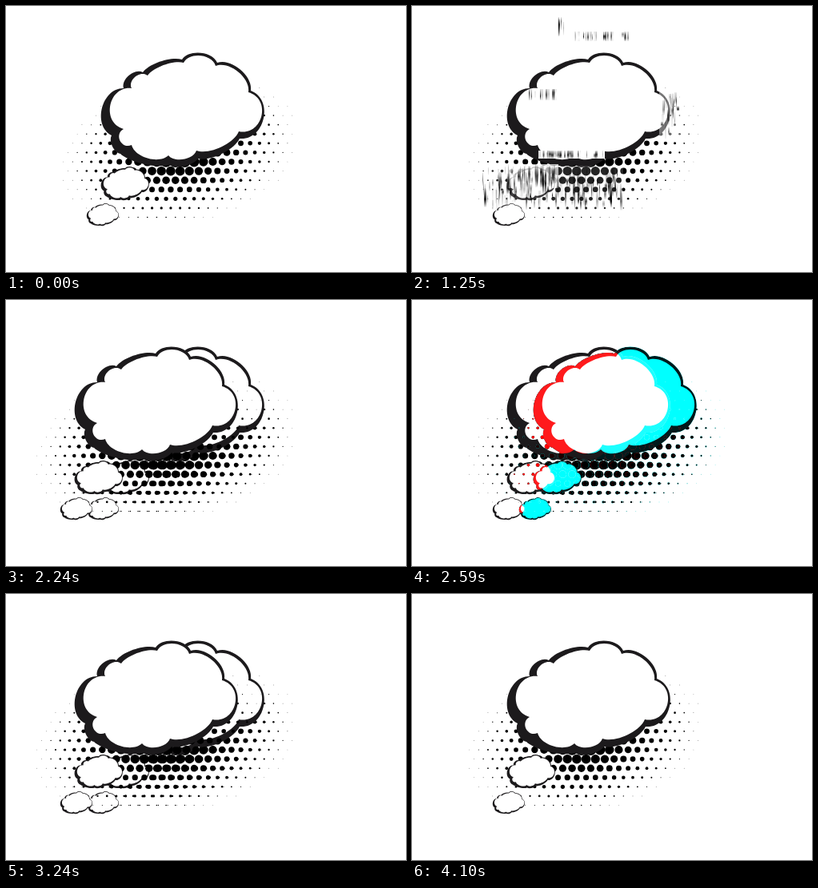
Write an HTML page with a canvas that moves like this. It is 500 px wide and 333 px high and loops after 4.13 s.

```html
<!DOCTYPE html>
<html lang="en">
<head>
<meta charset="utf-8">
<title>Glitching thought bubble</title>
<style>
  html, body { margin: 0; width: 100%; height: 100%; overflow: hidden; background: #fff; }
  canvas { display: block; width: 100vw; height: 100vh; }
</style>
</head>
<body>
<canvas id="stage" width="500" height="333"></canvas>
<script>
const W = 500, H = 333, LOOP = 4130, STEP = 70, SHIFT = 33;
const INK = '#1c1a1c';
const ctx = document.getElementById('stage').getContext('2d');

// Closed outline of rounded lobes; each point is a notch [x, y, bulge of the next lobe].
function cloud(notches) {
  const path = new Path2D();
  path.moveTo(notches[0][0], notches[0][1]);
  notches.forEach(([x, y, bulge], i) => {
    const [nx, ny] = notches[(i + 1) % notches.length];
    const dx = nx - x, dy = ny - y, len = Math.hypot(dx, dy);
    const along = .3 - .6 * bulge / len, out = bulge * 4 / 3 / len;
    const ox = dy * out, oy = -dx * out;
    path.bezierCurveTo(x + dx * along + ox, y + dy * along + oy,
      nx - dx * along + ox, ny - dy * along + oy, nx, ny);
  });
  return path;
}

const outer = cloud([
  [147, 103, 8], [171, 83, 6], [220, 67, 10.5], [264, 71, 12], [306, 106, 23.5],
  [292, 166, 7.5], [240, 191, 5.5], [204, 199, 6], [143, 185, 5], [132, 162, 20]
]);
const inner = cloud([
  [157, 103, 8.5], [177, 87, 5.5], [222, 71, 11], [262, 75, 12], [303, 108, 23],
  [291, 157, 8.7], [238, 181, 8], [203, 187, 10.5], [157, 174, 10.5], [147, 154, 22]
]);

function layer(paint) {
  const canvas = document.createElement('canvas');
  canvas.width = W;
  canvas.height = H;
  paint(canvas.getContext('2d'));
  return canvas;
}

function random(seed) {
  let s = seed * 7919 + 17;
  return () => {
    s = (s * 1664525 + 1013904223) % 4294967296;
    return s / 4294967296;
  };
}

function drawDots(g) {
  const gapX = 11.68, gapY = 11.58;
  for (let row = -8; row <= 6; row++) {
    const y = 195 + row * gapY;
    for (let col = -5; col < 20; col++) {
      const x = 130 + (col + (row & 1) / 2) * gapX;
      const u = (x - 217) / 137, v = (y - 183) / 88;
      const d = Math.sqrt(u * u + v * v + .4 * u * v);
      if (d > 1.07) continue;
      g.beginPath();
      g.arc(x, y, .35 + 8 * Math.max(0, 1 - d) ** 1.2, 0, 7);
      g.fill();
    }
  }
}

function drawBubbles(g, withInk) {
  for (const [x, y, scale] of [[120, 58, 1], [119, 201, .295], [101, 247, .197]]) {
    g.save();
    g.translate(x, y);
    g.scale(scale, scale);
    g.translate(-120, -58);
    if (withInk) {
      g.fillStyle = INK;
      g.fill(outer);
    }
    g.fillStyle = '#fff';
    g.fill(inner);
    g.restore();
  }
}

const art = layer(g => { drawDots(g); drawBubbles(g, true); });
const fill = layer(g => drawBubbles(g, false));
const tints = ['#c6c68b', '#8c8c8c', INK].map(color => layer(g => {
  drawBubbles(g, true);
  g.globalCompositeOperation = 'source-in';
  g.fillStyle = color;
  g.fillRect(0, 0, W, H);
}));

// Keeps only the given colour channels of the art.
function channels(color, dx) {
  return layer(g => {
    g.drawImage(art, dx, 0);
    g.globalCompositeOperation = 'multiply';
    g.fillStyle = color;
    g.fillRect(0, 0, W, H);
    g.globalCompositeOperation = 'destination-in';
    g.drawImage(art, dx, 0);
  });
}

const splitArt = layer(g => {
  g.drawImage(channels('#f00', 0), 0, 0);
  g.globalCompositeOperation = 'destination-in';
  g.drawImage(art, SHIFT, 0);
  g.globalCompositeOperation = 'lighter';
  g.drawImage(channels('#0ff', SHIFT), 0, 0);
});

const split = () => ctx.drawImage(splitArt, 0, 0);
const ghost = () => ctx.drawImage(art, -SHIFT, 0);

function spike(tip, y, end, h) {
  const mid = (tip + end) / 2;
  ctx.beginPath();
  ctx.moveTo(tip, y);
  ctx.lineTo(mid, y - h * .38);
  ctx.lineTo(end, y - h / 2);
  ctx.lineTo(end, y + h / 2);
  ctx.lineTo(mid, y + h * .38);
  ctx.fill();
}

// Grey tapered streaks on the right edge, one per dot row.
function drawSpikes(rnd) {
  ctx.fillStyle = '#85858d';
  for (let k = 0; k < 5; k++) {
    spike(487 - 76 * (1 - k / 4) ** 1.15, 206.5 + k * 11.6, 488, 6 - k * .6);
  }
  for (let y = 134; y < 187; y += 2.5) {
    const peak = 1 - Math.abs(Math.sin((y - 137) / 11.6 * Math.PI));
    spike(496 - (y - 134) * .22 - 14 * peak * (.6 + .6 * rnd()), y, 500, 3);
  }
}

// Smears each pixel row sideways: -1 blows left, 1 blows right.
const wind = side => step => {
  const rnd = random(60 + step);
  const row = (img, y, dx) => ctx.drawImage(img, 0, y, W, 1, side * dx, y, W, 1);
  for (let y = 58; y < 276; y++) {
    const tint = tints[Math.floor(rnd() * tints.length)];
    ctx.globalAlpha = .6;
    if (rnd() < .35) row(tint, y, Math.round(rnd() * (y > 200 ? 22 : 12)));
    ctx.globalAlpha = 1;
    row(fill, y, Math.round(4 + rnd() * 8));
    row(fill, y, 0);
  }
  ctx.save();
  if (side > 0) {
    ctx.translate(W, 0);
    ctx.scale(-1, 1);
  }
  drawSpikes(rnd);
  ctx.restore();
};

// A patch of soft vertical streaks over a partly white ground.
function smear(rnd, x, y, w, h, cover) {
  ctx.fillStyle = `rgba(255,255,255,${cover})`;
  ctx.fillRect(x, y, w, h);
  for (let n = w * h / 85 + w / 4; n > 0; n--) {
    const len = Math.min(h, 6 + rnd() * 22);
    const left = x + Math.floor(rnd() * (w - 2)), top = y + rnd() * (h - len);
    const fade = ctx.createLinearGradient(0, top, 0, top + len);
    fade.addColorStop(0, 'rgba(0,0,0,.1)');
    fade.addColorStop(.3 + rnd() * .4, `rgba(0,0,0,${.9 * rnd() ** 1.4})`);
    fade.addColorStop(1, 'rgba(0,0,0,.05)');
    ctx.fillStyle = fade;
    ctx.fillRect(left, top, 1 + Math.floor(rnd() * 3), len);
  }
}

// [x, y, width, height, white cover]
const patches = [
  [183, 14, 11, 24, 0], [203, 38, 70, 12, 0], [148, 108, 37, 14, .8],
  [306, 108, 26, 60, .4], [157, 178, 83, 10, 1],
  [120, 204, 64, 30, .7], [84, 206, 180, 56, .15]
];

// The patches drift apart from where they stand at the rest step.
const blocks = (seed, restStep) => step => {
  const drift = random(seed), rnd = random(seed + step);
  for (const [x, y, w, h, cover] of patches) {
    const away = (step - restStep) * 14;
    const px = x + Math.round((drift() - .5) * away);
    const py = y + Math.round((drift() - .5) * away);
    smear(rnd, px, Math.max(14, py), w, h, cover);
  }
};

const cycle = (...effects) => step => effects[step % effects.length](step);

// [start in ms, number of steps, effect]
const glitches = [
  [280, 7, cycle(split, wind(-1))],
  [1040, 5, blocks(20, 4)],
  [1620, 5, blocks(40, 2)],
  [2170, 7, cycle(split, ghost, wind(-1))],
  [2890, 7, cycle(wind(1), wind(-1), ghost)],
  [3610, 7, cycle(wind(1), split, wind(-1))]
];

let shown = '';
function render(t) {
  const glitch = glitches.find(([start, steps]) => t >= start && t < start + steps * STEP);
  const step = glitch ? Math.floor((t - glitch[0]) / STEP) : 0;
  const key = glitch ? `${glitch[0]}:${step}` : 'still';
  if (key === shown) return;
  shown = key;
  ctx.fillStyle = '#fff';
  ctx.fillRect(0, 0, W, H);
  ctx.drawImage(art, 0, 0);
  if (glitch) glitch[2](step);
}

const began = performance.now();
function tick() {
  render((performance.now() - began) % LOOP);
  requestAnimationFrame(tick);
}
tick();
</script>
</body>
</html>
```
